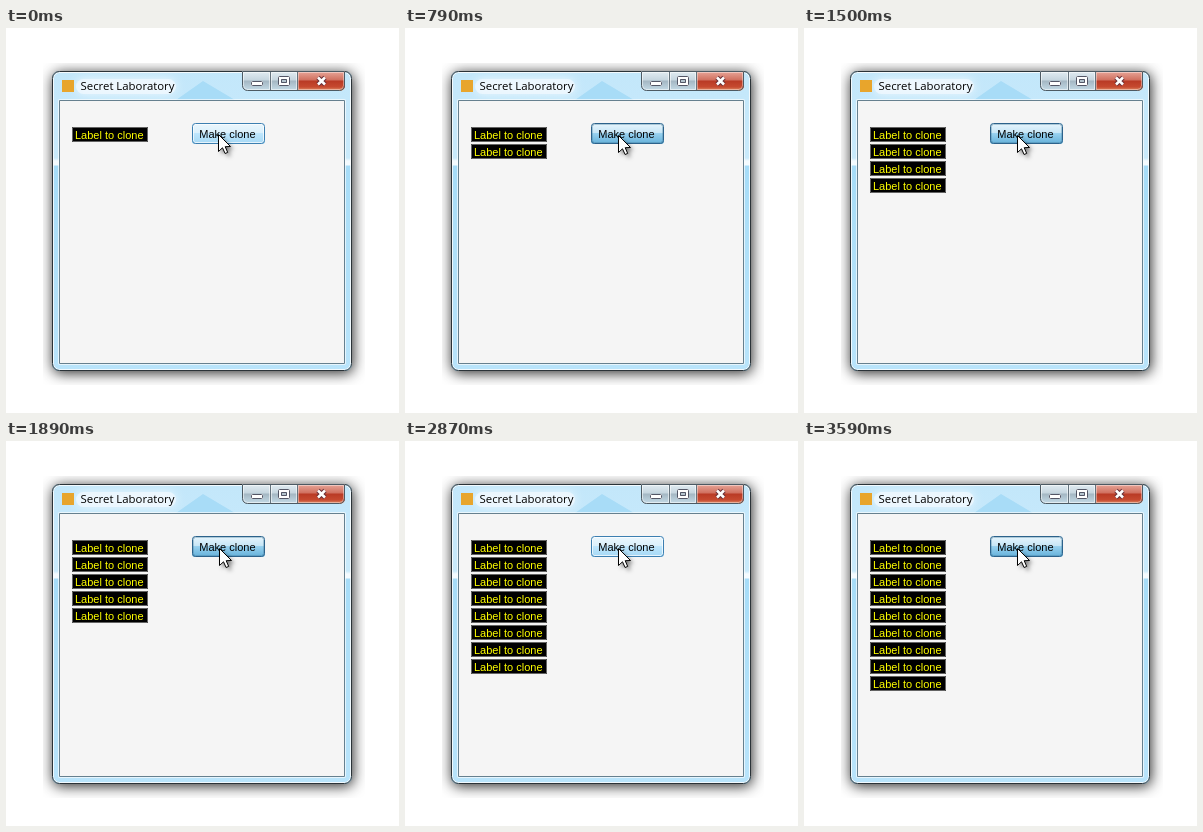
Animation of 393 by 385 pixels, one loop 3.65 s. Source, as an HTML page with a canvas:

```html
<!DOCTYPE html>
<html lang="en">
<head>
<meta charset="utf-8">
<title>Clone demo</title>
<style>
html, body { margin: 0; width: 100%; height: 100%; overflow: hidden; background: #fff; }
canvas { display: block; width: 393px; height: 385px; }
</style>
</head>
<body>
<canvas id="stage" width="393" height="385"></canvas>
<script>
const ctx = document.getElementById('stage').getContext('2d');
const LOOP = 3650;
const UI_FONT = '11px "Liberation Sans", Arial, sans-serif';
const TITLE_FONT = '11.4px "Open Sans", "Noto Sans", sans-serif';

// Each click: [button down, button up]; a clone appears on release.
const CLICKS = [
  [260, 390], [790, 850], [1110, 1170], [1500, 1630], [1890, 2020],
  [2350, 2480], [2740, 2870], [3200, 3260], [3590, LOOP]
];

function box(x, y, w, h, r) {
  ctx.beginPath();
  ctx.roundRect(x, y, w, h, r);
}

function fillBox(x, y, w, h, r, fill) {
  box(x, y, w, h, r);
  ctx.fillStyle = fill;
  ctx.fill();
}

function strokeBox(x, y, w, h, r, color) {
  box(x + 0.5, y + 0.5, w - 1, h - 1, r);
  ctx.strokeStyle = color;
  ctx.lineWidth = 1;
  ctx.stroke();
}

function poly(points, fill) {
  ctx.beginPath();
  points.forEach(([x, y]) => ctx.lineTo(x, y));
  ctx.closePath();
  ctx.fillStyle = fill;
  ctx.fill();
}

function vertical(y0, y1, ...stops) {
  const g = ctx.createLinearGradient(0, y0, 0, y1);
  stops.forEach(([at, color]) => g.addColorStop(at, color));
  return g;
}

function text(str, x, y, font, color) {
  ctx.font = font;
  ctx.fillStyle = color;
  ctx.fillText(str, x, y);
}

function withShadow(color, blur, dx, dy, draw) {
  ctx.save();
  ctx.shadowColor = color;
  ctx.shadowBlur = blur;
  ctx.shadowOffsetX = dx;
  ctx.shadowOffsetY = dy;
  draw();
  ctx.restore();
}

function drawGlass() {
  ctx.save();
  ctx.beginPath();
  ctx.rect(37, 35, 322, 322);
  ctx.clip();
  withShadow('rgba(0,0,0,0.85)', 14, 1, 2, () => fillBox(46, 43, 300, 300, 7, '#444'));
  ctx.restore();

  ctx.save();
  box(46, 43, 300, 300, 7);
  ctx.clip();
  ctx.fillStyle = vertical(43, 343,
    [0, '#c3e7fa'], [0.1, '#c5e8fb'], [0.29, '#c9eafb'], [0.3, '#f4fbff'],
    [0.312, '#f4fbff'], [0.318, '#a6dcf8'], [0.5, '#addff8'], [1, '#b9e4fb']);
  ctx.fillRect(46, 43, 300, 300);
  poly([[170, 72], [197, 53], [229, 72]], '#a8dcf7');
  withShadow('rgba(255,255,255,0.9)', 10, 0, 0,
    () => fillBox(70, 51, 100, 15, 8, 'rgba(240,249,255,0.75)'));
  ctx.restore();

  strokeBox(47, 44, 298, 298, 6, 'rgba(255,255,255,0.8)');
  strokeBox(46, 43, 300, 300, 7, '#2b3338');
}

function drawCaptionButtons() {
  ctx.save();
  box(236, 43, 103, 20, [0, 0, 5, 5]);
  ctx.clip();
  ctx.fillStyle = vertical(43, 63,
    [0, '#e3edf3'], [0.45, '#c6d6df'], [0.5, '#a4b7c3'], [1, '#c6dde9']);
  ctx.fillRect(236, 43, 56, 20);
  ctx.fillStyle = vertical(43, 63,
    [0, '#e9a99c'], [0.45, '#d0705f'], [0.5, '#b93a25'], [0.8, '#c64a30'], [1, '#e59a72']);
  ctx.fillRect(292, 43, 47, 20);
  ctx.restore();

  strokeBox(237, 44, 27, 18, [0, 0, 0, 4], 'rgba(255,255,255,0.55)');
  strokeBox(265, 44, 26, 18, 0, 'rgba(255,255,255,0.55)');
  strokeBox(292, 44, 46, 18, [0, 0, 4, 0], 'rgba(255,255,255,0.4)');
  strokeBox(236, 43, 103, 20, [0, 0, 5, 5], '#4d5a63');
  ctx.fillStyle = '#65737d';
  ctx.fillRect(264, 44, 1, 18);
  ctx.fillRect(291, 44, 1, 18);

  fillBox(245, 53, 12, 5, 1, '#fff');
  strokeBox(245, 53, 12, 5, 1, '#535666');
  fillBox(272, 48, 12, 10, 1, '#fff');
  strokeBox(272, 48, 12, 10, 1, '#535666');
  fillBox(275, 51, 6, 4, 0, '#b4c4ce');
  strokeBox(275, 51, 6, 4, 0, '#535666');

  [['#6a3038', 4.6], ['#fff', 2.6]].forEach(([color, width]) => {
    ctx.beginPath();
    ctx.moveTo(312, 49.5);
    ctx.lineTo(319, 56.5);
    ctx.moveTo(319, 49.5);
    ctx.lineTo(312, 56.5);
    ctx.strokeStyle = color;
    ctx.lineWidth = width;
    ctx.stroke();
  });
}

function drawWindow() {
  drawGlass();
  drawCaptionButtons();
  fillBox(56, 52, 12, 12, 0, '#e8a52c');
  text('Secret Laboratory', 74.5, 62, TITLE_FONT, '#000');
  strokeBox(52, 71, 288, 266, 1, 'rgba(255,255,255,0.65)');
  fillBox(53, 72, 286, 264, 0, '#f5f5f5');
  strokeBox(53, 72, 286, 264, 0, '#66808f');
}

function drawLabel(i) {
  const y = 99 + 17 * i;
  fillBox(66, y, 76, 15, 0, '#000');
  strokeBox(66, y, 76, 15, 0, '#646464');
  text('Label to clone', 69, y + 12, UI_FONT, '#ff0');
}

function drawButton(pressed) {
  const [a, b, c, d] = pressed
    ? ['#e5f4fc', '#c4e5f6', '#98d1ef', '#68b3db']
    : ['#eaf6fd', '#d9f0fc', '#bee6fd', '#a7d9f5'];
  fillBox(186, 95, 73, 21, 3, vertical(96, 115, [0, a], [0.5, b], [0.5, c], [1, d]));
  strokeBox(187, 96, 71, 19, 2, pressed ? 'rgba(70,120,150,0.35)' : 'rgba(255,255,255,0.7)');
  strokeBox(186, 95, 73, 21, 3, pressed ? '#2c628b' : '#3c7fb1');
  text('Make clone', 193.3, 110, UI_FONT, '#000');
}

function drawCursor(x, y) {
  const arrow = [[0, 0], [0, 17], [4, 13.3], [6.6, 19], [9.2, 17.9], [6.7, 12.2], [12, 12]]
    .map(([dx, dy]) => [x + 0.5 + dx, y + 0.5 + dy]);
  withShadow('rgba(0,0,0,0.5)', 4, 3, 3, () => poly(arrow, '#fff'));
  ctx.strokeStyle = '#000';
  ctx.lineWidth = 1;
  ctx.stroke();
}

function frame(now) {
  const t = now % LOOP;
  const clones = CLICKS.filter(([, up]) => t >= up).length;
  const pressed = CLICKS.some(([down, up]) => t >= down && t < up);
  const nudge = t < 60 ? 0 : 1;

  ctx.fillStyle = '#fff';
  ctx.fillRect(0, 0, 393, 385);
  drawWindow();
  for (let i = 0; i <= clones; i++) drawLabel(i);
  drawButton(pressed);
  drawCursor(212 + nudge, 106 + nudge);
}

const start = performance.now();
function tick() {
  frame(performance.now() - start);
  requestAnimationFrame(tick);
}
tick();
</script>
</body>
</html>
```
